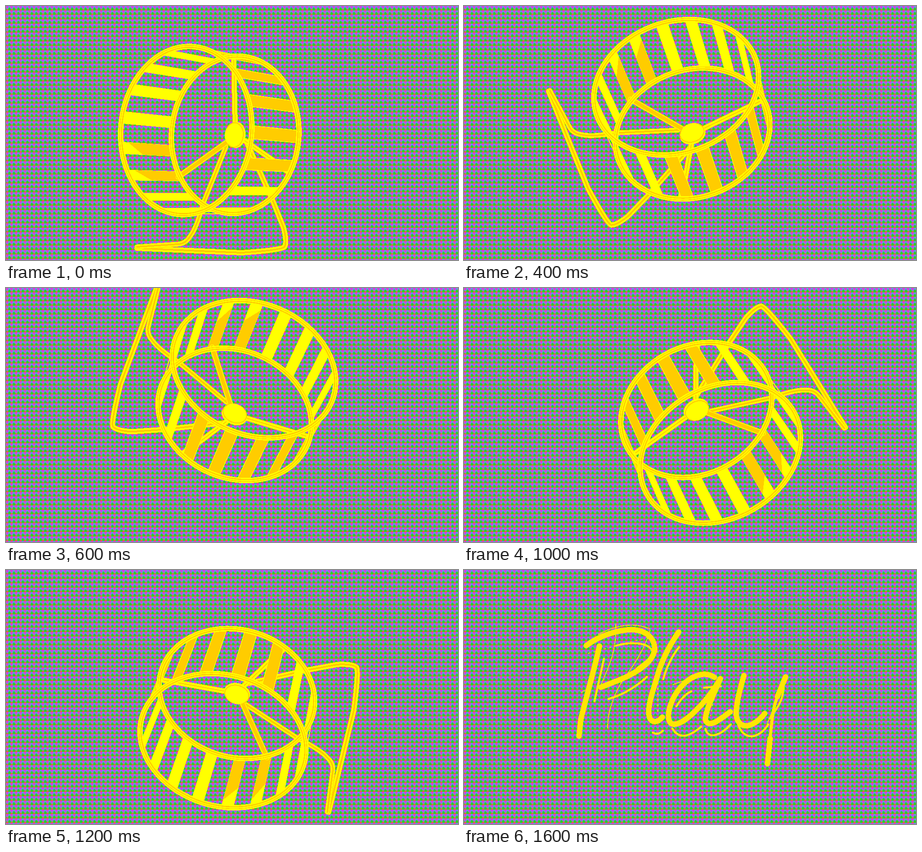
These frames come from a looping animation (998x561 px, 1.8 s). An HTML page:

```html
<!DOCTYPE html>
<html lang="en">
<head>
<meta charset="utf-8">
<title>Play wheel</title>
<style>
  html, body { margin: 0; width: 100%; height: 100%; overflow: hidden; }
  svg { display: block; width: 100vw; height: 100vh; }
  path, ellipse { fill: none; stroke-linecap: round; stroke-linejoin: round; }
  #play path { stroke: #ffe600; }
</style>
</head>
<body>
<svg viewBox="0 0 998 561" preserveAspectRatio="none" shape-rendering="crispEdges">
  <defs>
    <pattern id="weave" x="5.1" width="9.88" height="9.8" patternUnits="userSpaceOnUse">
      <rect width="10" height="10" fill="#5f9aee"/>
      <path d="M0 9.8V5L3 3L5.6 6V9.8Z" style="fill:#33cc22"/>
      <path d="M4 0H9.9V3.6L7.4 5.6L4 3Z" style="fill:#d440dc"/>
      <path d="M4.9 9.8L7.4 6L9.9 8V9.8Z" style="fill:#f0661e"/>
    </pattern>
  </defs>
  <rect width="998" height="561" fill="url(#weave)"/>
  <g id="wheel"></g>
  <g id="play" aria-label="Play">
    <g stroke-width="12">
      <path d="M299 168C289 215 270 280 258 330L254 367"/>
      <path d="M270 167C297 146 340 131 374 132C412 135 424 160 420 181C412 210 370 232 340 244L302 259"/>
      <path d="M474 137C452 169 436 200 426 237C417 268 407 294 408 317C410 338 425 340 438 325"/>
      <path d="M553 237C530 222 501 234 480 257C458 281 444 322 456 338C475 353 531 300 566 240C552 274 533 309 533 331C540 351 564 331 588 313"/>
      <path d="M618 233C609 266 598 303 602 326C612 359 646 341 664 317"/>
      <path d="M710 236L692 280M676 372L670 428"/>
    </g>
    <path d="M692 280C682 305 680 330 676 372" stroke-width="7"/>
    <g stroke-width="4.5">
      <path d="M309 196L288 290M336 167C365 159 408 158 416 180M319 285C350 276 380 258 404 236"/>
      <path d="M475 170C457 193 447 215 440 241M417 359Q428 366 439 355"/>
      <path d="M460 350C478 380 505 362 524 346M533 351C540 378 570 362 589 341M469 301Q485 275 502 268M530 260L567 257"/>
      <path d="M605 341C619 379 651 373 672 341M706 257C704 293 690 306 675 328"/>
    </g>
    <g stroke-width="1.6">
      <path d="M297 142C328 126 370 112 410 130M335 120C338 181 317 219 301 257"/>
      <path d="M411 133C399 176 372 214 346 251C329 281 317 316 317 349M427 180L380 217"/>
      <path d="M260 270L282 257M418 252L411 302M462 253L492 242M697 274L669 340"/>
      <path stroke-dasharray="3 9" d="M275 184L405 149M428 249L428 315M560 250L544 321M615 255L604 327"/>
    </g>
  </g>
</svg>
<script>
const YELLOW = '#ff0', ORANGE = '#fc0';
const HUB = [505, 285];
const TILT = 5 * Math.PI / 180;
const FRONT = { x: 398, y: 275, rx: 144.5, ry: 186 };
const BACK = { x: 506, y: 284.5, rx: 140.5, ry: 174 };

// Rotation in degrees, then hub position, one pose per step
const POSES = [
  [0, 505, 285], [34.5, 505, 286], [65.5, 504, 281], [108, 505, 278],
  [176.2, 504, 268], [235.8, 514, 270], [281.4, 510, 274], [325, 508, 274]
];
const STEP = 200, LOOP = 1800;

const wheel = document.getElementById('wheel');
const play = document.getElementById('play');

function add(tag, attrs, style) {
  const node = document.createElementNS('http://www.w3.org/2000/svg', tag);
  for (const key in attrs) node.setAttribute(key, attrs[key]);
  Object.assign(node.style, style);
  wheel.append(node);
}

function line(d, stroke, width) {
  add('path', { d }, { stroke, strokeWidth: width });
}

function tube(d, width, core = 4) {
  line(d, ORANGE, width);
  line(d, YELLOW, width - 2);
  line(d, ORANGE, core);
}

function oval(x, y, rx, ry, fill, stroke, width) {
  add('ellipse', { cx: x, cy: y, rx, ry, transform: `rotate(5 ${x} ${y})` },
    { fill, stroke, strokeWidth: width });
}

function ring({ x, y, rx, ry }, width) {
  oval(x, y, rx, ry, 'none', YELLOW, width);
  oval(x, y, rx - 2, ry - 2, 'none', ORANGE, 2.5);
  oval(x, y, rx + 2.5, ry + 2.5, 'none', ORANGE, 1.5);
}

function rimPoint({ x, y, rx, ry }, degrees) {
  const t = degrees * Math.PI / 180;
  const u = rx * Math.cos(t), v = ry * Math.sin(t);
  return [x + u * Math.cos(TILT) - v * Math.sin(TILT),
          y + u * Math.sin(TILT) + v * Math.cos(TILT)];
}

function slat(angle) {
  const onRight = angle < 30 || angle > 260;
  const half = onRight ? 4.5 : 4;
  const corners = [
    rimPoint(FRONT, angle - half), rimPoint(FRONT, angle + half),
    rimPoint(BACK, angle + half), rimPoint(BACK, angle - half)
  ];
  add('path', { d: `M${corners.join('L')}Z` },
    { fill: onRight ? ORANGE : YELLOW, stroke: YELLOW, strokeWidth: 1.5 });
  // Shaded part of the lower left slats
  if (angle > 140 && angle < 170) {
    const [a, b, c, d] = corners;
    const mix = (p, q, f) => p.map((n, i) => n + (q[i] - n) * f);
    const shade = [mix(a, d, .4), mix(b, c, .15), mix(b, c, .95), mix(a, d, .95)];
    add('path', { d: `M${shade.join('L')}Z` }, { fill: ORANGE });
  }
}

function buildWheel() {
  tube('M530 298L560 365L589 430L613 490Q621 522 615 532Q609 539 520 545L380 539L289 535', 12);
  tube('M486 310L435 437Q421 490 407 508Q397 525 380 526L289 532', 11);
  tube('M503 120L506 262', 12, 2);
  tube('M525 296L590 341L620 365', 12, 2);
  [-47.4, -25, -2.7, 19.5, 42, 67.6, 86, 104, 123.8, 144, 164.2,
    185.1, 205.4, 224.8, 244.6, 267, 290].forEach(slat);
  tube('M489 300L380 378', 13, 8);
  ring(BACK, 12);
  oval(508, 285, 20, 28, YELLOW, YELLOW, 2);
  oval(504, 285, 20, 27, YELLOW, ORANGE, 2);
  oval(501, 285, 17, 23, YELLOW, YELLOW, 1.5);
  ring(FRONT, 12);
}

function draw() {
  const pose = POSES[Math.floor(performance.now() % LOOP / STEP)];
  wheel.style.display = pose ? '' : 'none';
  play.style.display = pose ? 'none' : '';
  if (pose) {
    const [angle, x, y] = pose;
    wheel.setAttribute('transform',
      `translate(${x} ${y}) rotate(${angle}) translate(${-HUB[0]} ${-HUB[1]})`);
  }
  requestAnimationFrame(draw);
}

buildWheel();
draw();
</script>
</body>
</html>
```
